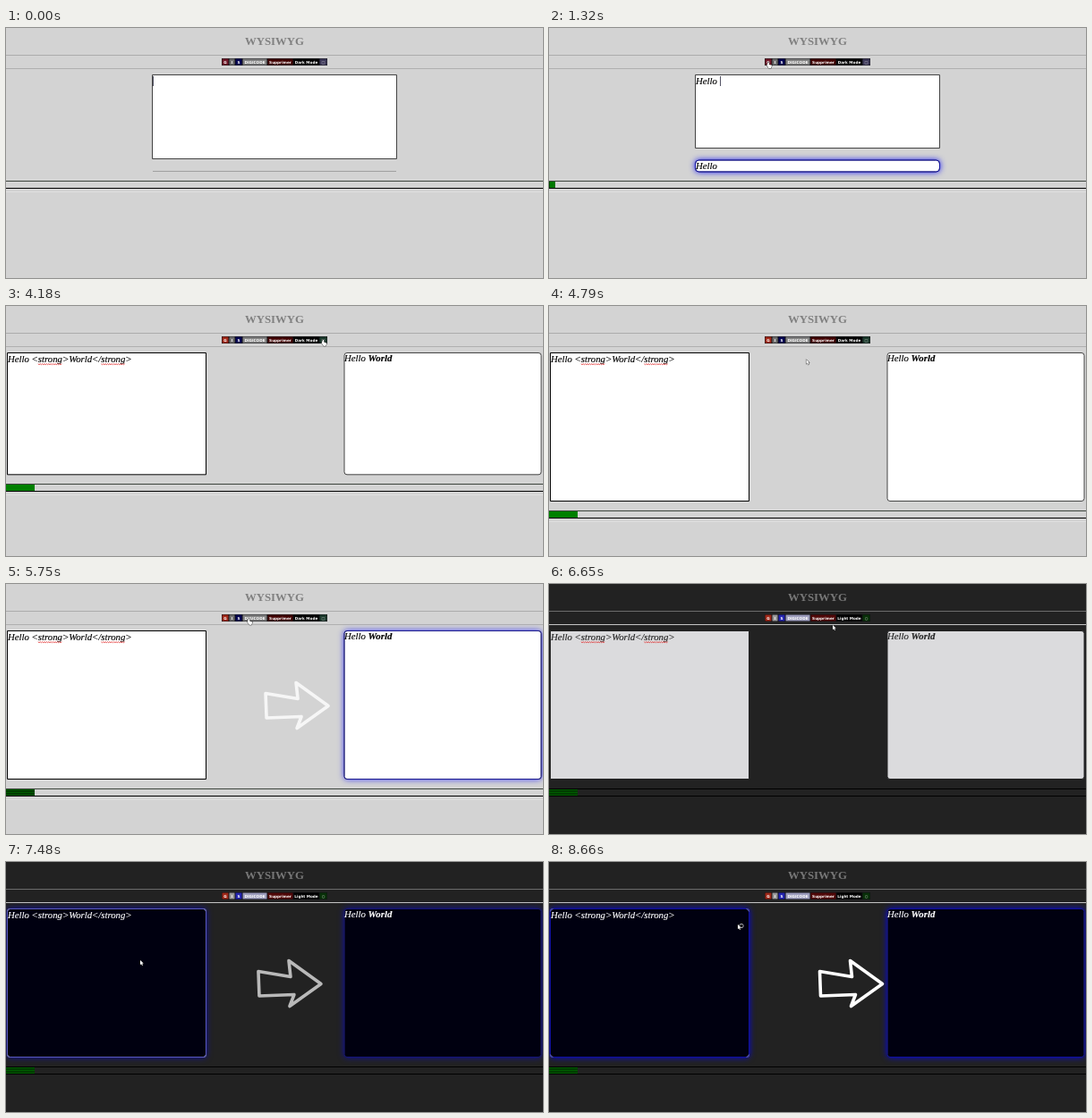
An HTML page with a canvas for the animation above (8.73 s loop, 600 px wide and 280 px high).

```html
<!DOCTYPE html>
<html lang="fr">
<head>
<meta charset="utf-8">
<title>WYSIWYG</title>
<style>
html, body { margin: 0; width: 100%; height: 100%; overflow: hidden; background: #d3d3d3; }
canvas { display: block; }
</style>
</head>
<body>
<canvas id="stage" width="600" height="280"></canvas>
<script>
const c = document.getElementById('stage').getContext('2d');
const LOOP = 8730;
const HELLO = 250, TAGS = 1400, WORLD = 1900, TYPED = 2800;
const SPLIT = 3805, HOVER = 4900, LEAVE = 5620, DARK = 6523, HOVER2 = 7080;
const SERIF = '"Liberation Serif", "Times New Roman", serif';
const SANS = '"DejaVu Sans", sans-serif';
const BODY = `italic 10.75px ${SERIF}`, BOLD = `italic bold 10.75px ${SERIF}`;
const OPEN = '<strong>', CLOSE = '</strong>';

// Arrival time and place of each pointer stop
const stops = [
  [900, 300, 90], [1250, 245, 39], [1780, 233, 10], [3600, 354, 38], [5100, 150, 105],
  [5750, 271, 39], [6450, 335, 38], [6650, 317, 46], [6930, 246, 78], [7400, 150, 110], [8600, 211, 70]
];

const clamp = v => Math.min(1, Math.max(0, v));
const smooth = v => v * v * (3 - 2 * v);

// The CSS "ease" curve, cubic-bezier(.25, .1, .25, 1)
function ease(x) {
  x = clamp(x);
  const bez = (u, a, b) => 3 * u * (1 - u) * (1 - u) * a + 3 * u * u * (1 - u) * b + u * u * u;
  let lo = 0, hi = 1;
  for (let i = 0; i < 20; i++) {
    const mid = (lo + hi) / 2;
    if (bez(mid, .25, .25) < x) lo = mid; else hi = mid;
  }
  return bez(lo, .1, 1);
}

// One-second transition switched on at a and off at b
const pulse = (t, a, b) => ease((Math.min(t, b) - a) / 1000) * (1 - ease((t - b) / 1000));

// One key every 170 ms
const typed = (word, start, t) => word.slice(0, Math.max(0, Math.floor((t - start) / 170) + 1));

function pointerAt(t) {
  const i = stops.findIndex(s => t < s[0]);
  if (i < 1) return stops[i < 0 ? stops.length - 1 : 0].slice(1);
  const [t0, ...p] = stops[i - 1], [t1, ...q] = stops[i];
  const k = smooth(clamp(1 - (t1 - t) / Math.min(500, t1 - t0)));
  return p.map((v, j) => v + (q[j] - v) * k);
}

function rect(x, y, w, h, color) {
  c.fillStyle = color;
  c.fillRect(x, y, w, h);
}

function write(s, x, y, font, color, weight = 0) {
  c.font = font;
  c.fillStyle = c.strokeStyle = color;
  c.fillText(s, x, y);
  if (weight) { c.lineWidth = weight; c.strokeText(s, x, y); }
  return x + c.measureText(s).width;
}

function polygon(points, x, y, scale = 1) {
  c.beginPath();
  points.forEach(([px, py]) => c.lineTo(x + px * scale, y + py * scale));
  c.closePath();
}

function panel(x, y, w, h, r, fill, border, glow) {
  c.beginPath();
  c.roundRect(x + .5, y + .5, w - 1, h - 1, r);
  c.lineWidth = 1;
  c.fillStyle = fill;
  c.shadowColor = `rgba(0,0,255,${glow})`;
  c.shadowBlur = 7;
  c.fill();
  c.shadowColor = 'transparent';
  c.strokeStyle = border;
  c.stroke();
  c.globalAlpha = glow;
  c.strokeStyle = '#1010a0';
  c.stroke();
  c.globalAlpha = 1;
}

function squiggle(x0, x1, y) {
  c.beginPath();
  for (let x = x0, i = 0; x <= x1; x += 1.2, i++) c.lineTo(x, y + (i % 2 ? .5 : -.5));
  c.lineWidth = .8;
  c.strokeStyle = '#e02020';
  c.stroke();
}

function source(x, y, hello, world, tags, color, marks, caret) {
  const put = s => { x = write(s, x, y, BODY, color, .15); };
  const tag = s => {
    if (!tags) return;
    c.font = BODY;
    const start = x + c.measureText(s.slice(0, -7)).width;
    put(s);
    if (marks) squiggle(start, x - 7, y + 2.2);
  };
  put(hello);
  tag(OPEN);
  put(world);
  if (caret) rect(Math.round(x), y - 9, 1, 11, '#556');
  tag(CLOSE);
}

function result(x, y, hello, world, color) {
  x = write(hello, x, y, BODY, color, .15);
  write(world, x, y, BOLD, color, .15);
}

function toolbar(t, dark) {
  const pick = (day, night) => dark ? night : day;
  const buttons = [
    [8, 'G', t < TAGS ? '#701828' : '#a02818'],
    [7, 'I', pick('#707070', '#999')],
    [8, 'S', pick('#000050', '#2424b0')],
    [28, 'DIGICODE', pick('#808080', '#9c9cbc')],
    [29, 'Supprimer', pick('#400000', '#500808')],
    [29, pick('Dark Mode', 'Light Mode'), '#000'],
    [9, pick('□', '○'), t < SPLIT ? '#3c3858' : pick('#1c3a2c', '#083008')]
  ];
  let x = 241;
  c.textAlign = 'center';
  for (const [w, label, color] of buttons) {
    rect(x, 34, w, 8, '#101014');
    rect(x + .5, 34.5, w - 1, 7, color);
    write(label, x + w / 2, 39.7, `bold 4.2px ${SANS}`, '#fff');
    x += w;
  }
  c.textAlign = 'left';
}

function footer(t, y, chars, dark) {
  const w = chars * 32 / 28;
  rect(0, y, 600, 1, dark ? '#000' : '#3c443c');
  rect(0, y + 8, 600, 1, '#000');
  if (!dark) rect(0, y + 12, 600, 1, '#e0e0e0');
  const steady = t > SPLIT && t < HOVER;
  rect(0, y + 1, w, 7, steady ? '#008000' : '#003c00');
  if (t < SPLIT) rect(Math.max(0, w - 6), y + 1, Math.min(w, 6), 7, '#007800');
  else if (!steady) for (let i = 1; i < 8; i += 3) rect(0, y + i, w, 1, '#005c00');
}

function arrow(shown) {
  const shape = [[0, 0], [36, 6], [34, -12], [70, 14], [35, 39], [40, 26], [1, 27.5]];
  polygon(shape, 302.5 - 65 * (1 - shown), 122.5);
  c.globalAlpha = shown;
  c.lineWidth = 3.6;
  c.lineJoin = 'round';
  c.strokeStyle = '#fff';
  c.stroke();
  c.globalAlpha = 1;
}

function mouse(t) {
  if (t < HELLO) return;
  const [x, y] = pointerAt(t);
  const hand = y > 33 && y < 42 && x > 240 && x < 360;
  const shape = hand
    ? [[0, 0], [1.4, 0], [1.4, 3], [5, 4], [4, 8], [1, 8], [-1.6, 4]]
    : [[0, 0], [0, 6], [1.4, 5], [2.5, 7], [3.4, 6.5], [2.5, 4.4], [4.2, 4.2]];
  polygon(shape, x, y, .85);
  c.lineWidth = .9;
  c.strokeStyle = '#222';
  c.stroke();
  c.fillStyle = '#fff';
  c.fill();
  if (t > 8500) {
    c.beginPath();
    c.arc(x + 4, y + 1.5, 2.2, 0, 7);
    c.strokeStyle = '#bbb';
    c.stroke();
  }
}

function stacked(t, hello, world) {
  panel(163, 52, 274, hello ? 83 : 95, 0, '#fff', '#444', 0);
  source(164, 63, hello, world, t >= TAGS, '#000', true, t < TYPED);
  if (hello) {
    panel(163, 147.5, 274, 14, 4, '#fff', '#446', pulse(t, HELLO, TYPED));
    result(164, 158, hello, world, '#000');
  } else {
    rect(164, 160, 272, 1, '#a0a0a0');
  }
}

function sideBySide(t, h, hello, world, dark) {
  const fade = ease((t - DARK) / 1000), ink = 255 * fade;
  const fill = `rgb(${255 - ink},${255 - ink},${255 - 239 * fade})`;
  const color = `rgb(${ink},${ink},${ink})`;
  const again = t >= HOVER2, over = again || (t > HOVER && t < LEAVE);
  const shown = again ? pulse(t, HOVER2, LOOP) : pulse(t, HOVER, LEAVE);
  panel(1, 52, 223, h, over ? 3 : 0, fill, color, over ? shown : 0);
  panel(377.5, 52, 221, h, 3, fill, dark ? '#222' : '#444', shown);
  source(2, 63, hello, world, true, color, !again, false);
  result(378, 62, hello, world, color);
  arrow(shown);
}

function draw(t) {
  const dark = t >= DARK;
  const hello = typed('Hello ', HELLO, t - 0), world = typed('World', WORLD, t);
  // The counter follows a key once it is released
  const keys = typed('Hello ', HELLO, t - 150).length + typed('World', WORLD, t - 150).length;
  const chars = keys + (keys > 6 ? OPEN.length + CLOSE.length : 0);
  const h = 83 + 84 * ease((t - SPLIT) / 1000);

  rect(0, 0, 600, 280, dark ? '#222' : '#d3d3d3');
  c.textAlign = 'center';
  write('WYSIWYG', 300, 19, `bold 12.8px ${SERIF}`, dark ? '#777' : '#808080');
  c.textAlign = 'left';
  rect(0, 30, 600, 1, dark ? '#6c6c6c' : '#acacac');
  rect(0, 45, 600, 1, dark ? '#c4c4c4' : '#b0b0b0');
  toolbar(t, dark);
  if (t < SPLIT) stacked(t, hello, world);
  else sideBySide(t, h, hello, world, dark);
  footer(t, t < SPLIT ? 171 : Math.round(62 + h), chars, dark);
  mouse(t);
}

function frame() {
  draw(performance.now() % LOOP);
  requestAnimationFrame(frame);
}
frame();
</script>
</body>
</html>
```
